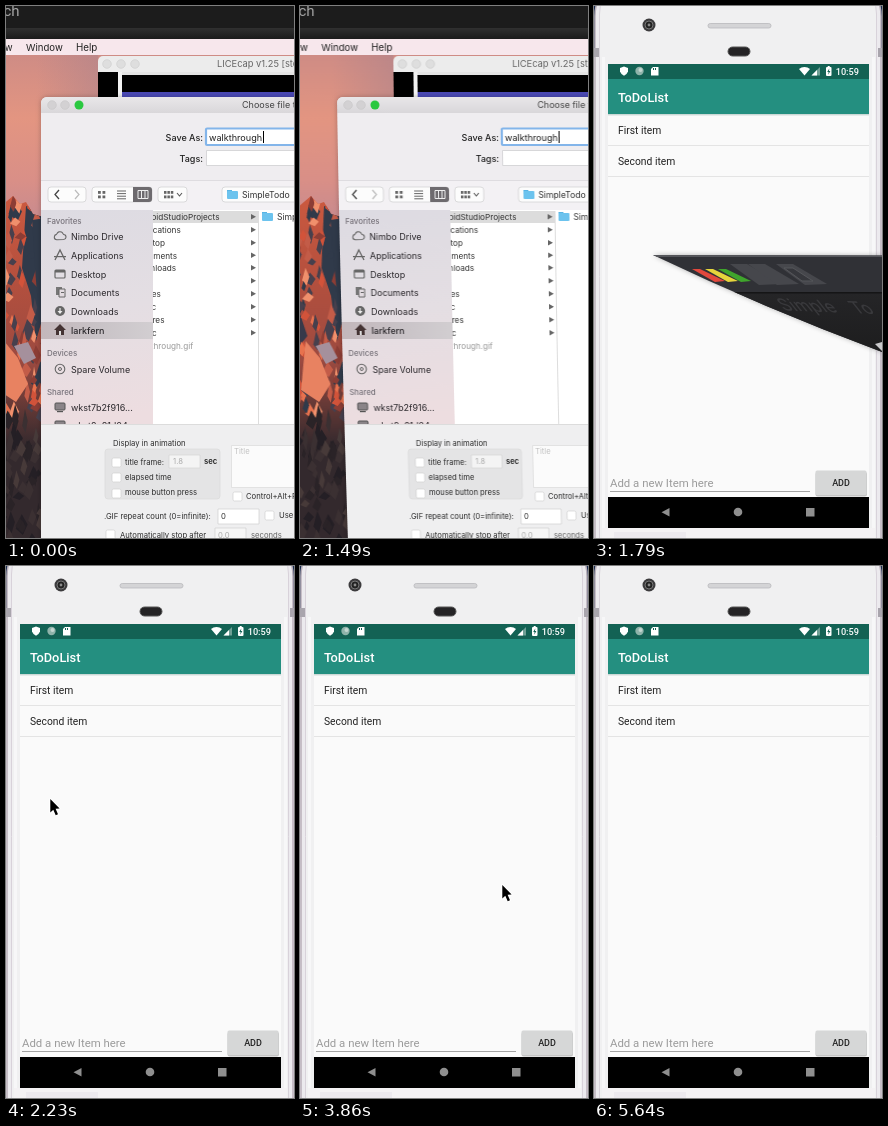
These frames come from a looping animation (288x532 px, 8000 ms). An HTML page with a canvas:

```html
<!DOCTYPE html>
<html lang="en">
<head>
<meta charset="utf-8">
<title>To-do list walkthrough</title>
<style>
html, body { margin: 0; width: 288px; height: 532px; overflow: hidden; background: #000; }
canvas { display: block; }
</style>
</head>
<body>
<canvas id="stage" width="288" height="532"></canvas>
<script>
const W = 288, H = 532, LOOP = 8000, PAD = 380;
const UI = 'Inter, sans-serif', DROID = 'Roboto, sans-serif';
const stage = document.getElementById('stage').getContext('2d');
let c;

function layer(width, offset, draw) {
  const el = document.createElement('canvas');
  el.width = width;
  el.height = H;
  c = el.getContext('2d');
  c.translate(offset, 0);
  draw();
  return el;
}
function rect(x, y, w, h, fill) {
  c.fillStyle = fill;
  c.fillRect(x, y, w, h);
}
function round(x, y, w, h, r, fill, stroke, line = 1) {
  c.beginPath();
  c.roundRect(x, y, w, h, r);
  paint(fill, stroke, line);
}
function paint(fill, stroke, line = 1) {
  if (fill) { c.fillStyle = fill; c.fill(); }
  if (stroke) { c.strokeStyle = stroke; c.lineWidth = line; c.stroke(); }
}
function dot(x, y, r, fill, stroke, line) {
  c.beginPath();
  c.arc(x, y, r, 0, 7);
  paint(fill, stroke, line);
}
// Path given as "x,y x,y ..."
function poly(points, fill, stroke, line, open) {
  c.beginPath();
  points.split(' ').forEach(p => c.lineTo(...p.split(',').map(Number)));
  if (!open) c.closePath();
  paint(fill, stroke, line);
}
function text(s, x, y, size, fill = '#222', weight = 400, align = 'left', font = UI) {
  c.font = `${weight} ${size}px ${font}`;
  c.textAlign = align;
  c.fillStyle = fill;
  c.fillText(s, x, y);
}
function gradient(x0, y0, x1, y1, ...colors) {
  const g = c.createLinearGradient(x0, y0, x1, y1);
  colors.forEach((k, i) => g.addColorStop(i / (colors.length - 1), k));
  return g;
}
function seeded(seed) {
  return () => (seed = seed * 16807 % 2147483647) / 2147483647;
}

function drawWallpaper() {
  rect(-200, 49, 488, 483, gradient(0, 49, 0, 300, '#cf8c85', '#e39581', '#d98f87', '#bd8893', '#a08096'));
  rect(30, 49, 62, 150, gradient(30, 0, 92, 0, 'rgba(170,130,140,0)', 'rgba(170,130,140,.5)'));
  c.save();
  poly('-200,319 -166,300 -120,276 -85,262 -50,244 -28,222 -12,214 -5,200 7,190 14,198 20,196 27,208 40,212 150,260 150,532 -200,532');
  c.clip();
  rect(-200, 185, 400, 347, gradient(0, 185, 0, 440, '#cd5a40', '#b5503e', '#9c4a40', '#33292d'));
  poly('20,200 40,208 40,300 30,335 25,290 16,262', '#303a4a');
  poly('-60,262 -25,250 0,330 -60,400 -200,400 -200,330 -120,290', '#37394a');
  // Steep shards: bright on the slopes, dark rock in the foreground
  const rnd = seeded(4711);
  const lit = ['#e8724e', '#d2533a', '#f0906c', '#303a4a', '#8c3d35', '#47404d', '#c35c48'];
  const rock = ['#2a2327', '#3b3032', '#473a39', '#241f25'];
  for (let i = 0; i < 700; i++) {
    const x = -200 + rnd() * 250, y = 185 + rnd() * 350;
    const w = 2 + rnd() * 4, h = 7 + rnd() * 18;
    const tones = y > 392 + rnd() * 16 ? rock : lit;
    poly(`${x},${y} ${x + w},${y + h * .5} ${x + w * .2},${y + h} ${x - w},${y + h * .7}`,
      tones[Math.floor(rnd() * tones.length)]);
  }
  poly('26,214 40,212 40,305 32,300 29,262', '#2f3949');
  poly('-2,335 12,352 22,378 10,396 -8,384', '#e88261');
  poly('8,340 22,336 30,352 18,358', '#a5909c');
  c.restore();
}

function drawRecorder() {
  round(92, 50, 220, 60, [5, 5, 0, 0], '#ececec');
  rect(92, 66, 196, 30, '#000');
  rect(112, 66, 4, 30, '#f2f2f2');
  rect(116, 66, 172, 3, '#e4e4e4');
  rect(116, 86, 172, 5, '#4a49b5');
  [101, 115, 129].forEach(x => dot(x, 58, 4.3, '#dedede', '#cfcfcf', .7));
  text('LICEcap v1.25 [stopped]', 211, 61, 9.3, '#666');
}

const sideIcons = [
  (x, y) => { c.beginPath(); c.arc(x - 3, y + 1, 2.7, 1.6, 4.5); c.arc(x, y - 1, 3.3, 3.6, 5.8); c.arc(x + 3.5, y + 1, 2.5, 4.8, 7.8); c.closePath(); paint(null, '#666', 1.1); },
  (x, y) => { poly(`${x - 5},${y + 5} ${x},${y - 5} ${x + 5},${y + 5}`, null, '#666', 1.3, true); rect(x - 6, y + 1, 12, 1.2, '#666'); },
  (x, y) => { round(x - 5, y - 4, 10, 8, 1, null, '#666', 1.2); rect(x - 5, y - 4, 10, 2.5, '#666'); },
  (x, y) => { rect(x - 4, y - 5, 6, 8, '#777'); round(x - 1, y - 3, 6, 8, 0, '#e2dbe0', '#666'); rect(x + 1, y, 3, 1, '#666'); },
  (x, y) => { dot(x, y, 5, '#666'); poly(`${x - 2.5},${y} ${x + 2.5},${y} ${x},${y + 3}`, '#eee'); rect(x - .6, y - 3, 1.2, 4, '#eee'); },
  (x, y) => { poly(`${x - 6},${y} ${x},${y - 6} ${x + 6},${y} ${x + 4},${y} ${x + 4},${y + 5} ${x - 4},${y + 5} ${x - 4},${y}`, '#433'); rect(x - 1, y + 1, 2, 4, '#ddd'); },
  (x, y) => { dot(x, y, 4.8, null, '#666', 1.1); dot(x, y, 1.5, null, '#666'); },
  (x, y) => { round(x - 5, y - 4, 10, 7, 1, '#8a8488', '#555'); rect(x - 3, y + 4, 6, 1.2, '#555'); }
];

function drawSidebar() {
  c.save();
  c.beginPath();
  c.rect(35, 204, 112, 214);
  c.clip();
  rect(35, 204, 112, 214, gradient(35, 204, 70, 418, '#dddbe2', '#e4dee3', '#eddde0'));
  rect(35, 316, 112, 17, gradient(35, 0, 147, 0, '#c3b7bb', '#c8c2c6', '#d2ced1'));
  [['Favorites', 218], ['Devices', 350], ['Shared', 389]].forEach(([s, y]) => text(s, 41, y, 7.9, '#77727a', 500));
  const items = [['Nimbo Drive', 234], ['Applications', 253], ['Desktop', 272], ['Documents', 290], ['Downloads', 309],
    ['larkfern', 328], ['Spare Volume', 367], ['wkst7b2f916...', 405], ['wkst2c81d04...', 423]];
  items.forEach(([s, y], i) => {
    text(s, 65, y, 9, '#2b282c', i === 5 ? 500 : 400);
    sideIcons[Math.min(i, 7)](54, y - 4);
  });
  c.restore();
}

function folder(x, y) {
  rect(x, y, 5, 2, '#58b4e4');
  round(x, y + 1, 11, 8, 1, '#6cc3ee');
}

function drawColumns() {
  c.save();
  c.beginPath();
  c.rect(147, 204, 141, 214);
  c.clip();
  rect(147, 204, 141, 214, '#fff');
  rect(147, 205, 105, 12, '#dcdcdc');
  rect(252, 205, 1, 213, '#ddd');
  const rows = [['AndroidStudioProjects', 214], ['Applications', 227], ['Desktop', 240], ['Documents', 252.5], ['Downloads', 265],
    ['', 278], ['Movies', 291], ['Music', 304], ['Pictures', 317], ['Public', 330]];
  rows.forEach(([s, y]) => {
    text(s, 127, y, 8.2, '#333');
    poly(`245,${y - 6} 250,${y - 3.3} 245,${y - .6}`, '#666');
  });
  text('walkthrough.gif', 127, 343, 8.2, '#999');
  folder(256, 206);
  text('SimpleTodo', 271, 214, 8.6, '#333');
  c.restore();
}

function drawToolbar() {
  const box = (x, w) => round(x, 181, w, 15, 3, '#fcfcfc', '#d2d2d4', .8);
  box(42, 38); box(86, 60); box(152, 29); box(216, 90);
  poly('53,184 49,188.5 53,193', null, '#444', 1.3, true);
  poly('69,184 73,188.5 69,193', null, '#bbb', 1.2, true);
  for (let i = 0; i < 4; i++) rect(92 + i % 2 * 4.5, 185 + (i >> 1) * 4.5, 2.8, 2.8, '#666');
  for (let i = 0; i < 4; i++) rect(111, 184.5 + i * 2.6, 9, 1, '#666');
  round(127, 181, 19, 15, [0, 3, 3, 0], '#6d6a6e');
  round(132, 184.5, 10, 8, 0, null, '#eee');
  rect(135, 184, 1, 8, '#eee');
  rect(138.5, 184, 1, 8, '#eee');
  for (let i = 0; i < 6; i++) rect(158 + i % 3 * 3.4, 185 + (i > 2) * 4.5, 2.5, 2.8, '#666');
  poly('171,187 173.5,190 176,187', null, '#555', 1.1, true);
  folder(221, 184);
  text('SimpleTodo', 236, 192, 8.7, '#333');
}

function drawOptions() {
  const tick = (x, y) => round(x, y, 9, 9, 1.5, '#fff', '#d0d0d0', .7);
  const label = (s, x, y, fill = '#2d2d2d', weight) => text(s, x, y, 7.7, fill, weight);
  rect(35, 418, 253, 114, '#efeff0');
  rect(35, 418, 253, 1, '#dcdcdc');
  label('Display in animation', 107, 440);
  round(99, 443, 115, 50, 3, '#e4e4e5', '#dadada', .7);
  [[106, 452], [106, 467], [106, 483], [227, 486], [259, 505], [100, 524]].forEach(p => tick(...p));
  label('title frame:', 119, 459);
  round(163, 449, 31, 13, 0, '#f4f4f4', '#d5d5d5', .7);
  label('1.8', 167, 458, '#aaa');
  label('sec', 198, 458, '#222', 600);
  label('elapsed time', 119, 474);
  label('mouse button press', 119, 489);
  round(225.5, 439.5, 80, 42, 0, '#fbfbfb', '#dadada', .7);
  label('Title', 228, 448, '#c2c2c2');
  label('Control+Alt+P pauses', 240, 493);
  label('.GIF repeat count (0=infinite):', 98, 513);
  round(212, 503, 41, 15, 0, '#fff', '#cfcfcf', .7);
  label('0', 215, 513);
  label('Use transparency', 273, 512);
  label('Automatically stop after', 114, 532);
  round(209, 522, 31, 14, 0, '#f6f6f6', '#d0d0d0', .7);
  label('0.0', 212, 532, '#aaa');
  label('seconds', 245, 532, '#666');
}

function drawDialog() {
  c.save();
  c.shadowColor = 'rgba(0,0,0,.25)';
  c.shadowBlur = 5;
  round(35, 91, 280, 460, [6, 6, 0, 0], '#efedf0');
  c.restore();
  round(35, 91, 280, 16, [6, 6, 0, 0], gradient(0, 91, 0, 107, '#e9e7e9', '#d9d7da'));
  [46, 59].forEach(x => dot(x, 99, 4.3, '#d3d1d3', '#c6c4c6', .6));
  dot(73, 99, 4.5, '#2bc840');
  text('Choose file to write', 236, 102, 9, '#444');
  text('Save As:', 197, 135, 9, '#222', 500, 'right');
  text('Tags:', 197, 156, 9, '#222', 500, 'right');
  round(200, 122.5, 110, 16.5, 1, '#fff', '#83b5ea', 2.2);
  text('walkthrough', 203, 135, 9.1);
  rect(257, 125, 1, 12, '#000');
  round(200.5, 144.5, 110, 15, 0, '#fff', '#d0d0d2', .8);
  rect(35, 174, 253, 1, '#dedce0');
  rect(35, 175, 253, 29, '#f3f1f4');
  drawToolbar();
  drawSidebar();
  drawColumns();
}

function drawDesktop() {
  rect(-377, 0, 12, H, gradient(-377, 0, -365, 0, 'rgba(0,0,0,0)', 'rgba(0,0,0,.08)', 'rgba(0,0,0,.25)'));
  rect(-365, 0, 700, H, '#000');
  rect(-365, 0, 700, 22, '#1c1c1c');
  rect(-365, 22, 700, 11, gradient(0, 22, 0, 33, '#303030', '#1b1b1b'));
  text('Search', 13.5, 9.5, 15, '#a5a5a5', 400, 'right', DROID);
  drawWallpaper();
  rect(-200, 33, 488, 16, '#f7e7ec');
  [['Format', -27], ['View', 6.5]].forEach(([s, x]) => text(s, x, 45, 9.6, '#222', 400, 'right'));
  text('Window', 20, 45, 9.6);
  text('Help', 70, 45, 9.8);
  drawRecorder();
  drawDialog();
  drawOptions();
}

function drawPhone() {
  const droid = (s, x, y, size, fill, weight, align) => text(s, x, y, size, fill, weight, align, DROID);
  rect(0, 0, W, H, '#e9e4ec');
  rect(0, 0, W, 44, '#182b4e');
  round(1, -32, 286, 620, 42, '#eceaee', '#b9b0b9', 1.5);
  round(5.5, -30, 277, 610, 38, '#f0f0f1', '#d8d2da', 1);
  rect(0, 42, 5, 9, '#a9a5ad');
  rect(284, 42, 4, 9, '#a9a5ad');
  rect(8, 51, 3, 481, '#f7f7f8');
  rect(278, 51, 3, 481, '#f7f7f8');

  dot(55, 19, 6.5, '#3c3b3d');
  dot(55, 19, 4, '#222', '#777');
  dot(55, 19, 1.4, '#8a8a8a');
  round(114, 17.5, 63, 4.5, 2.2, '#d4d4d6', '#b9b9bd', .8);
  round(134, 41, 22, 9, 4.5, '#242325', '#555');

  rect(14, 58, 261, 15, '#136254');
  rect(14, 73, 261, 35, '#248f80');
  rect(14, 108, 261, 383, '#fafafa');
  rect(14, 108, 261, 2, gradient(0, 108, 0, 110, '#bfcfcc', '#f2f4f4'));
  poly('30,60.5 34,62 34,65.5 32.5,68 30,69.8 27.5,68 26,65.5 26,62', '#fff');
  dot(45.5, 65, 4.2, '#8fb3aa');
  dot(46.5, 64, 2, '#c3d6d1');
  poly('59,61 64.5,61 64.5,69.5 57,69.5 57,63', '#fff');
  rect(59, 62, 1, 2, '#136254');
  rect(61, 62, 1, 2, '#136254');
  poly('205,63 207.5,61.6 210.5,61 213.5,61.6 216,63 210.5,69.5', '#fff');
  poly('226,61 226,69.5 217.5,69.5', '#6f9f95');
  poly('223,64 223,69.5 217.5,69.5', '#fff');
  round(232, 61, 5.5, 9, 1, '#fff');
  rect(233.7, 60, 2, 1, '#fff');
  poly('235.3,62.5 233.2,66 234.6,66 234.2,68.7 236.4,65 235,65', '#136254');
  droid('10:59', 265, 69, 9.2, '#fff', 500, 'right');
  droid('ToDoList', 24, 95.5, 12.8, '#fff', 500);

  droid('First item', 24, 127.5, 10.3, '#222');
  droid('Second item', 24, 158.5, 10.3, '#222');
  rect(14, 139, 261, 1, '#e4e4e4');
  rect(14, 170, 261, 1, '#e4e4e4');
  droid('Add a new Item here', 16, 481, 11.4, '#9b9b9b');
  rect(16, 485, 200, 1, '#a3a3a3');
  round(221.5, 466, 51.5, 24.5, 2, '#c4c4c4');
  round(221.5, 464.5, 51, 24.5, 1.5, '#d6d7d7');
  droid('ADD', 247, 479.5, 9, '#222', 500, 'center');

  rect(14, 491, 261, 31, '#000');
  poly('75.5,502 75.5,510.5 67.5,506.2', '#8f8f8f');
  dot(144, 506, 4.3, '#8f8f8f');
  rect(212, 502, 8.5, 8.5, '#8f8f8f');
  rect(8, 522, 273, 10, '#f4f2f4');
  rect(20, 526, 72, 6, '#ece9ee');
}

// Last visible corner of the window as it is pulled away
function drawCorner() {
  c.save();
  c.beginPath();
  c.moveTo(59, 249);
  c.lineTo(288, 249.5);
  c.lineTo(288, 346);
  c.quadraticCurveTo(170, 302, 59, 249);
  c.shadowColor = 'rgba(0,0,0,.3)';
  c.shadowBlur = 5;
  paint('#303136');
  c.shadowBlur = 0;
  c.clip();
  rect(59, 249, 229, 2, '#55565b');
  rect(59, 287, 229, 60, gradient(0, 287, 0, 346, '#252527', '#1d1d1e'));
  rect(140, 286, 148, 1.5, '#151516');
  ['#e2483d', '#e6d53c', '#3fa52c'].forEach((fill, i) => {
    const x = 98 + i * 13;
    poly(`${x},263 ${x + 8},263 ${x + 33},275 ${x + 23},276`, fill);
  });
  [136, 154, 182].forEach(x => poly(`${x},258 ${x + 17},258 ${x + 51},278 ${x + 29},279`, '#46474c'));
  poly('190,262 199,262 219,275 208,275', '#36373c', '#55565a', 1);
  c.transform(1, .04, .8, 1, -240, -8);
  text('Simple', 186, 305, 17, '#39393c', 500);
  text('To', 258, 305, 17, '#39393c', 500);
  c.restore();
  poly('281,338 288,336 288,345', '#c9c9cb');
}

// [start, x, y]; without a place the pointer is hidden
const pointer = [[0], [2230, 43, 233], [2520], [3120, 182, 117], [3270, 175, 117], [3420, 177, 115], [3560, 226, 67],
  [3710, 217, 254], [3860, 201, 319], [4310, 170, 419], [4460, 147, 487], [4600, 168, 514], [4750, 172, 515],
  [4900, 213, 522], [5350, 212, 528], [5640]];

function drawPointer(t) {
  const [, x, y] = pointer.findLast(p => p[0] <= t);
  if (x === undefined) return;
  c.save();
  c.translate(x, y);
  c.lineJoin = 'round';
  const arrow = '1.3,0 1.3,13.5 4.3,10.8 6.7,16.3 9,15.3 6.6,9.8 10.6,9.5';
  poly(arrow, null, '#fff', 2);
  poly(arrow, '#000');
  c.restore();
}

const desktop = layer(PAD + W + 12, PAD, drawDesktop);
const phone = layer(W, 0, drawPhone);

// Pulls the window aside row by row: shift and scale depend on the height
function drawPulled(shift, scale) {
  for (let y = 0; y < H; y++) {
    const s = scale(y);
    c.drawImage(desktop, 0, y, desktop.width, 1, shift(y) - PAD * s, y, desktop.width * s, 1);
  }
}

function render(t) {
  c = stage;
  if (t < 1490) {
    c.drawImage(desktop, -PAD, 0);
    return;
  }
  c.drawImage(phone, 0, 0);
  if (t < 1640) drawPulled(y => 1 + 11.8 * (y / 510) ** 1.4, y => 1 - .018 * y / 510);
  else if (t < 1790) drawPulled(y => 20 + .5 * y + .002 * y * y, y => 1 - .001 * y);
  else if (t < 1940) drawCorner();
  else drawPointer(t);
}

function tick() {
  render(performance.now() % LOOP);
  requestAnimationFrame(tick);
}
tick();
</script>
</body>
</html>
```
